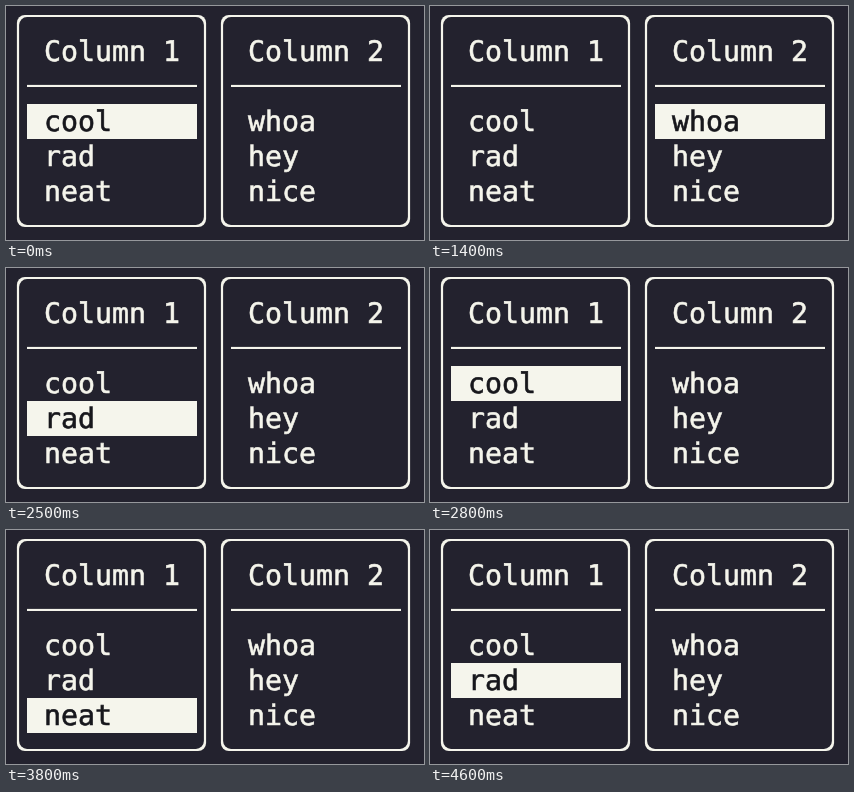
Write an HTML page that moves like this. It is 418 by 234 pixels and loops after 6400 ms.

```html
<!DOCTYPE html>
<html lang="en">
<head>
<meta charset="utf-8">
<style>
  html, body { margin: 0; height: 100%; overflow: hidden; background: #23222e; }
  svg { display: block; width: 418px; height: 234px; }
  text {
    font: 28.24px "DejaVu Sans Mono", monospace;
    fill: #f5f5ec; stroke: #f5f5ec; stroke-width: .6;
    text-rendering: geometricPrecision;
  }
  text.on { fill: #17171c; stroke: #17171c; }
  .light { fill: #f5f5ec; }
  .dark { fill: #23222e; }
</style>
</head>
<body>
<svg id="stage" viewBox="0 0 418 234"></svg>
<script>
const LOOP = 6400, BEAT = 100, COLUMN = 204, ROW = 35;
const columns = [["cool", "rad", "neat"], ["whoa", "hey", "nice"]];
// One character per beat: h, j, k, l move left, down, up, right; a dot waits.
const keys = "...........l.....j..j.h..k.k..l.j..h.j..l..k..h";
const stage = document.getElementById("stage");

function add(tag, attrs, text = "") {
  const el = document.createElementNS("http://www.w3.org/2000/svg", tag);
  for (const key in attrs) el.setAttribute(key, attrs[key]);
  el.textContent = text;
  return stage.appendChild(el);
}

const box = (name, x, y, width, height, rx = 0) =>
  add("rect", { class: name, x, y, width, height, rx });
const label = (x, y, text) => add("text", { x, y }, text);

columns.forEach((_, c) => {
  const x = c * COLUMN;
  box("light", x + 10.9, 8.9, 189.2, 212.2, 8);
  box("dark", x + 13.1, 11.1, 184.8, 207.8, 8);
  box("light", x + 21, 78.9, 170, 2.1);
  label(x + 38, 55, `Column ${c + 1}`);
});
const bar = box("light", 0, 0, 170, ROW);
const items = columns.map((words, c) =>
  words.map((word, r) => label(38 + c * COLUMN, 125 + r * ROW, word)));

function draw(now) {
  const beat = Math.floor(now % LOOP / BEAT);
  let col = 0, row = 0;
  for (const key of keys.slice(0, beat + 1)) {
    col += (key === "l") - (key === "h");
    row += (key === "j") - (key === "k");
  }
  bar.setAttribute("x", 21 + col * COLUMN);
  bar.setAttribute("y", 98 + row * ROW);
  items.forEach((list, c) => list.forEach((el, r) =>
    el.classList.toggle("on", c === col && r === row)));
}

const start = performance.now();
function tick() {
  draw(performance.now() - start);
  requestAnimationFrame(tick);
}
tick();
</script>
</body>
</html>
```
